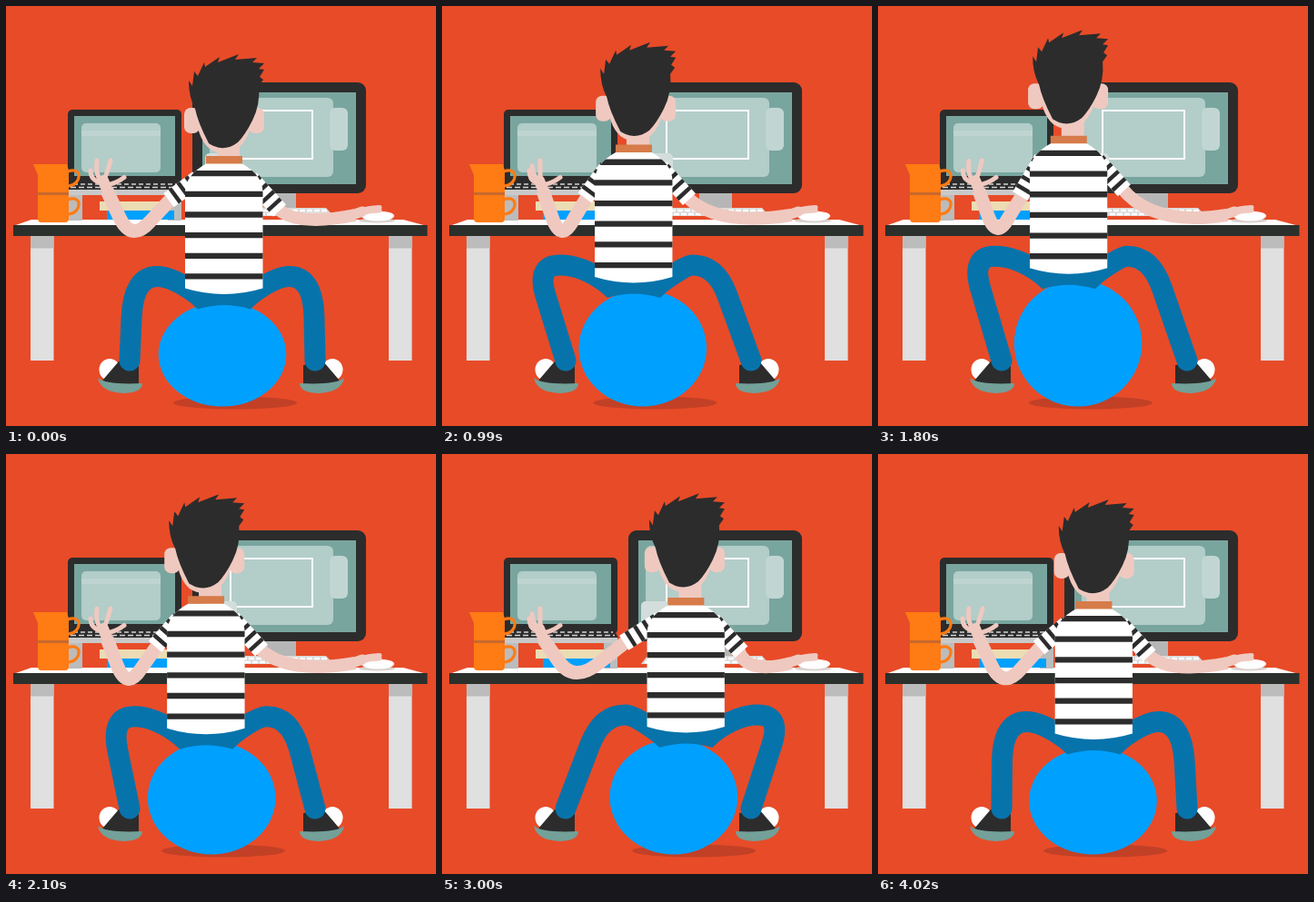
Animation, 473 px wide and 462 px high, one loop 4.05 s. Source, as an HTML page with a canvas:

```html
<!DOCTYPE html>
<html lang="en">
<head>
<meta charset="utf-8">
<title>At the desk</title>
<style>
html, body { margin: 0; height: 100%; overflow: hidden; background: #e84b28; }
canvas { display: block; }
</style>
</head>
<body>
<canvas id="stage" width="473" height="462"></canvas>
<script>
const g = document.getElementById('stage').getContext('2d');
const LOOP = 4050, STEP = 30;
const RED = '#e84b28', DARK = '#2c2c2c', SKIN = '#efc9c0', JEANS = '#0773ab', BLUE = '#00a0ff',
  TEAL = '#79a59f', PALE = '#b3cdc9', ORANGE = '#ff7b14', GREY = '#bcbcbc';

const fill = (d, color) => { g.fillStyle = color; g.fill(new Path2D(d)); };
const line = (d, width, color, cap = 'round', dash = [], offset = 0) => {
  g.strokeStyle = color; g.lineWidth = width; g.lineCap = cap; g.lineJoin = 'round';
  g.setLineDash(dash); g.lineDashOffset = offset;
  g.stroke(new Path2D(d));
};
const rect = (x, y, w, h, color, r = 0) => {
  g.fillStyle = color; g.beginPath(); g.roundRect(x, y, w, h, r); g.fill();
};
const oval = (x, y, rx, ry, color) => {
  g.fillStyle = color; g.beginPath(); g.ellipse(x, y, rx, ry, 0, 0, 7); g.fill();
};

// Motion
const clamp = u => Math.max(0, Math.min(1, u));
const ease = (t, from, to) => .5 - .5 * Math.cos(Math.PI * clamp((t - from) / (to - from)));
const pulse = u => Math.sin(Math.PI * u) ** 2;

// -1 is left, +1 is right: a hop left, a long roll right, a quick return.
const swayAt = t => 2.07 * ease(t, 1620, 3330) - ease(t, 500, 1110) - 1.15 * ease(t, 3330, 4020);

// Four bounces, each a little lower than the last.
const LANDINGS = [0, 1110, 2130, 3300, 4000];
function bounceAt(t) {
  const next = LANDINGS.findIndex(l => l > t);
  if (next < 0) return 0;
  const last = LANDINGS[next - 1];
  return (27 - .0027 * t) * pulse((t - last) / (LANDINGS[next] - last));
}

const curlAt = t => pulse(t / 2000);
const liftAt = t => clamp(2 - Math.abs((t + 225) % 1050 - 525) / 70);

function room() {
  rect(0, 0, 473, 462, RED);
  fill('M28 235H437L463 242H8Z', '#fff');

  // laptop on its stand
  rect(68, 114, 125, 84, DARK, 5);
  rect(75, 121, 111, 66, TEAL);
  rect(83, 129, 87, 54, PALE, 5);
  rect(83, 137, 87, 6, '#bfd4d1');
  fill('M72 193H189L194 202H67Z', DARK);
  line('M74 196H188', 1.4, '#d2d2d2', 'butt', [5, 3]);
  line('M71 199.5H190', 1.4, '#d2d2d2', 'butt', [6, 3]);
  rect(69, 202, 124, 6, '#c9c9c9');
  rect(69, 208, 15, 28, GREY);
  rect(178, 208, 15, 28, GREY);
  rect(103, 215, 75, 10, '#ecdcb4');
  rect(111, 225, 74, 10, BLUE);

  // stacked cups
  for (const y of [182, 213]) line(`M68 ${y}C84 ${y - 6} 84 ${y + 14} 69 ${y + 16}`, 3.2, ORANGE);
  fill('M30 174H67L69 181V234Q69 238 65 238H39Q35 238 35 234V186Z', ORANGE);
  rect(35, 205, 34, 3, '#c8682c');

  // monitor
  rect(283, 206, 36, 18, '#b6b6b6');
  rect(205, 84, 191, 122, DARK, 9);
  rect(216, 95, 169, 101, TEAL);
  rect(224, 101, 136, 87, PALE, 6);
  rect(356, 112, 20, 47, '#c1d6d3', 6);
  line('M247 115H337V168H247Z', 2, '#fff');
  rect(219, 162, 35, 30, '#d3dedc', 5);

  // keyboard and mouse
  fill('M226 222H352L360 231H219Z', '#d9d9d9');
  line('M227 225H353M223 229H357', 2.4, '#fff', 'butt', [6, 2]);
  oval(408, 236, 20, 2.5, '#d8d2cd');
  oval(409, 231, 18, 5.5, '#fff');

  // table
  rect(8, 241, 455.5, 12, '#2b302d');
  for (const x of [27, 421]) {
    rect(x, 253, 25.5, 137, '#e0e0e0');
    rect(x, 253, 25.5, 13.5, GREY);
  }
}

function shoe() {
  oval(114, 400, 11.5, 12, '#fff');
  fill('M106 412L124 391L146 395V418H112Z', DARK);
  fill('M101 409Q110 417 150 415Q150 425 130 426Q104 425 101 409Z', '#73a098');
}

function mirrored(draw) {
  g.save(); g.translate(473, 0); g.scale(-1, 1); draw(); g.restore();
}

// Shin rises from the ankle, bends at the knee and runs into the hip; s is the side.
function leg(ankle, knee, hip, low, sway, s) {
  const top = low - 13, soft = .5 - .2 * Math.abs(sway);
  const px = knee + (ankle - knee) * soft, py = top + (390 - top) * soft;
  line(`M${ankle} 390L${px} ${py}Q${knee} ${top} ${knee + s * 26} ${top}` +
    `Q${hip - s * 14} ${top} ${hip + s * 12} ${low + 6}`, 23, JEANS);
}

// Bands are counted from the cuff towards the shoulder.
function sleeve(x, y, cuffX, cuffY) {
  const d = `M${cuffX} ${cuffY}L${x} ${y}`;
  line(d, 19, '#fff', 'butt');
  line(d, 19, DARK, 'butt', [4.5, 6.5], 4.5);
}

function leftHand(k) {
  line('M113 207L107 192', 12, SKIN);
  line(`M103 194Q${93 + k * 3} 191 ${93 + k * 3} 181`, 5, SKIN);
  line(`M104 192Q${98 + k * 2} 184 ${100 - k} ${170 + k * 6}`, 5, SKIN);
  line(`M108 191Q${112 - k * 4} 182 ${115 - k * 7} 170`, 5, SKIN);
  line('M109 197Q120 196 130 188.5', 5, SKIN);
}

function rightHand(up) {
  line('M378 231L392 226', 11, SKIN);
  line(`M390 225Q398 ${222 - up} ${411 - up * 3} ${221.5 - up * 10.5}`, 5, SKIN);
  line(`M390 228Q400 ${225 - up} ${411 - up} ${225 - up * 5}`, 5, SKIN);
}

function arms(x, y, sway, t) {
  const lx = x - 18 - sway * 8, ly = 211 + (y - 168) * .2 - 5 * Math.max(0, sway);
  const ex = 138 + sway * 8, ey = 256 - sway * 6 + (y - 170) * .4;
  line(`M111 203L${(111 + ex) / 2} ${(203 + ey) / 2}Q${ex} ${ey} ${(lx + ex) / 2} ${(ly + ey) / 2}` +
    `L${lx + 3} ${ly - 2}`, 15, SKIN, 'butt');
  leftHand(curlAt(t));
  sleeve(x + 14, y + 9, lx, ly);

  const rx = x + 104, ry = y + 44;
  line(`M${rx - 3} ${ry - 3}Q${318 + (rx - 301) * .55} 243 384 230`, 14, SKIN, 'butt');
  rightHand(liftAt(t));
  sleeve(x + 72, y + 9, rx, ry);
}

function torso(x, y, low) {
  const r = x + 85.5, gap = (low - y) * .175;
  g.save();
  g.clip(new Path2D(`M${x} ${low}V${y + 24}Q${x} ${y + 5} ${x + 24} ${y - 8}H${x + 62}` +
    `Q${r} ${y + 5} ${r} ${y + 24}V${low}Q${x + 43} ${low + 13} ${x} ${low}Z`));
  rect(x, y - 10, 86, 150, '#fff');
  for (let i = 0; i < 6; i++) rect(x, y + i * gap, 86, 6.3, DARK);
  g.restore();
}

function head(x, y) {
  g.save();
  g.translate(x - 200, y - 53);
  rect(195, 112, 17, 28, SKIN, 7);
  rect(266, 112, 17, 28, SKIN, 7);
  fill('M207 110Q208 145 223 157Q237 166 254 157Q270 143 272 110Z', SKIN);
  fill('M200 82L204 88L206 72L210 77L217 62L218 67L234 56L232 62L255 53L251 59L275 57L270 62' +
    'L283 63L277 69L283 70L278 78L282 81L277 88Q279 108 270 126Q262 142 254 150Q237 163 219 149' +
    'L222 151Q210 128 207 113Q200 100 200 82Z', DARK);
  g.restore();
}

function draw(t) {
  const sway = swayAt(t), bounce = bounceAt(t), right = Math.max(0, sway);
  const rise = 11 * Math.sqrt(Math.max(0, -sway));
  const x = 197 + 32 * sway, r = x + 85.5;
  const y = 181 - rise - bounce * .72, low = y + 129.5 - 4 * right;
  const hx = 201 + 32 * swayAt(t - 40), hy = 53 - rise - bounce;

  room();
  arms(x, y, sway, t);

  oval(252 + 24 * sway + 5 * sway * sway, 436.5, 68, 7, '#c24026');
  const tall = 57 + (311 - low) * .55;
  oval(238 + 19 * sway, 440.5 - tall, 70.3, tall, BLUE);

  shoe();
  mirrored(shoe);
  leg(136, 140 + 40 * sway, x, low, sway, 1);
  leg(340, 338 + 40 * sway, r, low, sway, -1);
  fill(`M${x - 6} ${low + 5}L${x + 14} ${low + 23}Q${x + 43} ${low + 14} ${x + 72} ${low + 23}` +
    `L${r + 6} ${low + 5}L${r} ${low - 8}H${x}Z`, JEANS);

  torso(x, y, low);
  const collar = Math.max(y - 16, hy + 112);
  rect(x + 35, hy + 92, 25, collar - hy - 91, SKIN);
  head(hx, hy);
  rect(x + 23, collar, 40, 8.5, '#d67b49');
}

const start = performance.now();
function tick() {
  draw(Math.floor((performance.now() - start) % LOOP / STEP) * STEP);
  requestAnimationFrame(tick);
}
tick();
</script>
</body>
</html>
```
